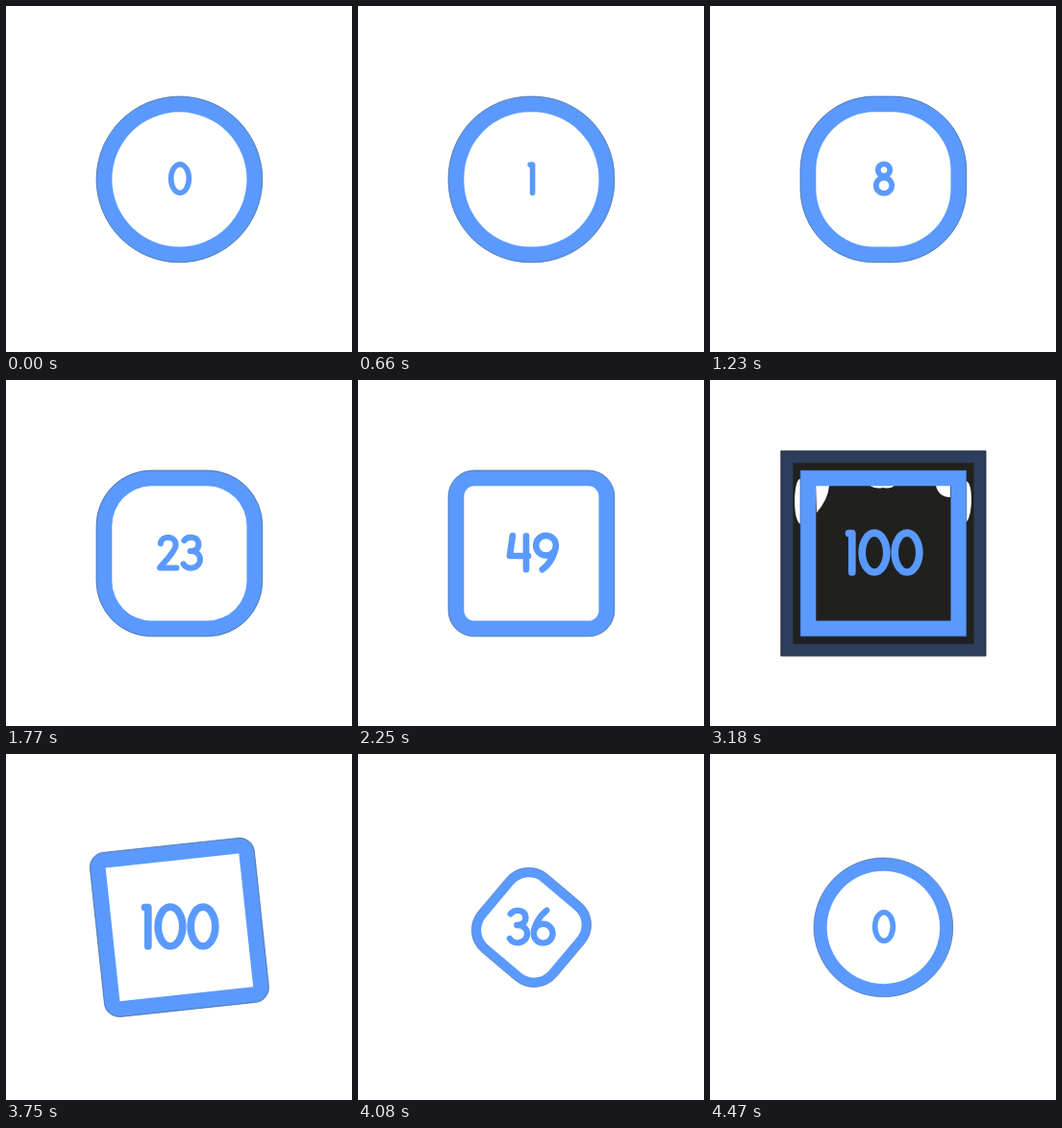
An HTML page for the animation above (4.5 s loop, 360x360 px).

```html
<!DOCTYPE html>
<html lang="en">
<head>
<meta charset="utf-8">
<title>Counter morph</title>
<style>
html, body { margin: 0; width: 100%; height: 100%; overflow: hidden; background: #fff; }
svg { display: block; width: 100%; height: 100%; }
</style>
</head>
<body>
<svg viewBox="0 0 360 360" role="img" aria-label="Counter from 0 to 100">
  <defs><clipPath id="inside"><path id="hole"/></clipPath></defs>
  <g id="echo">
    <g id="dark" clip-path="url(#inside)" fill="#20211f" stroke="#20211f" stroke-linejoin="round">
      <path d="M115 79H165Q160 91 145 90Q120 91 115 79Z"/>
      <path d="M193 79H282V282H236Q236 262 262 262C262 240 273 230 272 205C264 180 268 165 273 155C283 130 281 115 281 100Q281 84 262 84Q250 84 242 91Q215 92 193 79Z"/>
      <path d="M78 250H94V266H130Q132 272 142 271Q150 270 150 266H182Q196 267 200 276Q215 283 230 277L238 266V282H78Z"/>
      <path d="M155 249Q164 240 166 225Q168 214 173 207H212Q212 217 219 224Q228 234 228 249Z"/>
      <path d="M160 150Q174 145 175 134Q176 124 184 122Q195 121 198 128L207 134Q207 138 195 139Q184 142 178 150Z"/>
    </g>
    <g fill="#fff">
      <path d="M110 110H124Q123 124 111 138Z"/>
      <path d="M165 109H193Q188 114 180 112Q172 114 165 109Z"/>
      <path d="M235 110H250V122Q238 122 235 110Z"/>
      <path d="M94 103Q89 103 88 124Q88 146 94 150Z"/>
      <path d="M266 105Q272 106 272 126Q271 145 266 148Z"/>
    </g>
    <path id="frame" fill="#2c3e5c" fill-rule="evenodd" stroke="#20211f" stroke-width=".6"/>
    <g id="ghost" fill="#24324c">
      <path d="M208 151Q222 146 231 163Q237 183 228 203Q222 210 217 207Q228 190 225 172Q220 156 208 151Z"/>
      <ellipse cx="137.500" cy="153.500" rx="5" ry="5.500"/>
      <circle cx="138.500" cy="205" r="3"/>
      <path d="M164 157Q170 149 175 151V157ZM165 202H179L175 208Z"/>
    </g>
  </g>
  <path id="ring" fill="#5a9aff" fill-rule="evenodd"/>
  <path id="rim" fill="none" stroke="#33517f" stroke-width=".6"/>
  <g id="count" fill="none" stroke="#5a9aff" stroke-width="7.700" stroke-linecap="round" stroke-linejoin="round"></g>
</svg>
<script>
const LOOP = 4500, MID = 180.4, HALF = 86.4;
const BLUE_WIDTH = 16.3, NAVY_WIDTH = 13;
const el = id => document.getElementById(id);
const clamp = x => Math.max(0, Math.min(1, x));
const span = (t, a, b) => clamp((t - a) / (b - a));
const inOut = p => p < 0.5 ? 4 * p ** 3 : 1 - 4 * (1 - p) ** 3;

// Each digit: cell width and centre line, cap height 48
const DIGITS = [
  [34, "M0-20.400A12.800 20.400 0 1 1 0 20.400A12.800 20.400 0 1 1 0-20.400Z"],
  [14, "M-2.500-20H.8V20.400"],
  [31, "M-10-12C-9-23 10-23 10-10C10-2-5 12-11 20H11"],
  [31, "M-10-16C-4-23 9-21 9-11C9-4 3-2-2-2C5-2 11 2 11 9C11 21-6 24-11 15"],
  [31, "M-6.300-20.400L-9.800 4H12.400M10-20V20.400"],
  [31, "M9-20H-7L-8-3C0-8 11-4 11 7C11 21-5 24-11 15"],
  [34, "M3-20.400C-7-13-13 0-13.400 8.600A12 12 0 1 0 10.600 8.600A12 12 0 1 0-13.400 8.600"],
  [30, "M-11-20H11L-3 20.400"],
  [32, "M0-20.400A8.300 8.300 0 1 1 0-3.800A8.300 8.300 0 1 1 0-20.400ZM0-1.400A10.900 10.900 0 1 1 0 20.400A10.900 10.900 0 1 1 0-1.400Z"],
  [34, "M-3 20.400C7 13 13 0 13.400-8.600A12 12 0 1 0-10.600-8.600A12 12 0 1 0 13.400-8.600"]
];

function box(h, r) {
  const a = h - r;
  const corner = (x, y) => `A${r} ${r} 0 0 1 ${x} ${y}`;
  return `M${-a} ${-h}H${a}${corner(h, -a)}V${a}${corner(a, h)}H${-a}${corner(-h, a)}V${-a}${corner(-a, -h)}Z`;
}

const band = (h, w, r) => box(h, r) + box(h - w, Math.max(0, r - w));
const at = `translate(${MID} ${MID})`;

function place(id, d, transform = at) {
  el(id).setAttribute("d", d);
  el(id).setAttribute("transform", transform);
}

function drawCount(n) {
  const cells = [...String(n)].map(c => DIGITS[c]);
  let x = -cells.reduce((sum, c) => sum + c[0], 0) / 2;
  const marks = cells.map(([w, d]) => {
    const mark = `<path transform="translate(${x + w / 2} 0)" d="${d}"/>`;
    x += w;
    return mark;
  });
  el("count").innerHTML = marks.join("");
  el("count").setAttribute("transform", `translate(181 179.600) scale(${(35 + 0.13 * n) / 48})`);
}

function drawEcho(t) {
  const on = t >= 2730 && t < 3300;
  el("echo").style.display = on ? "" : "none";
  if (!on) return;
  const grow = t < 2880
    ? 1 - (1 - span(t, 2700, 2880)) ** 2
    : 1 - span(t, 2880, 3300) ** 4.1;
  const h = HALF + 27.3 * grow;
  place("frame", band(h, NAVY_WIDTH, 0));
  place("hole", box(h - NAVY_WIDTH + 1, 0));
  el("dark").setAttribute("stroke-width", 220 * span(t, 2850, 3120));
  el("ghost").setAttribute("opacity", 1 - span(t, 2880, 3000));
}

function drawRing(t) {
  const back = span(t, 3600, LOOP);
  const round = t < 3600 ? 1 - span(t, 0, 2550) ** 3 : span(t, 3600, 4440);
  const turn = -45 * (1 - Math.cos(Math.PI * back));
  const scale = t < 4140
    ? 1 - 0.6 * span(t, 3600, 4140) ** 3.8
    : 0.4 + 0.6 * span(t, 4140, LOOP) ** 3.75;
  const pose = `${at} rotate(${turn}) scale(${scale})`;
  place("ring", band(HALF, BLUE_WIDTH, HALF * round), pose);
  place("rim", box(HALF, HALF * round), pose);
}

function draw(t) {
  drawRing(t);
  drawEcho(t);
  drawCount(t < 3600
    ? Math.floor(100 * span(t, 0, 2850) ** 3 + 0.001)
    : Math.round(100 * (1 - inOut(span(t, 3750, 4350)))));
}

const start = performance.now();
function tick() {
  draw((performance.now() - start) % LOOP);
  requestAnimationFrame(tick);
}
draw(0);
requestAnimationFrame(tick);
</script>
</body>
</html>
```
